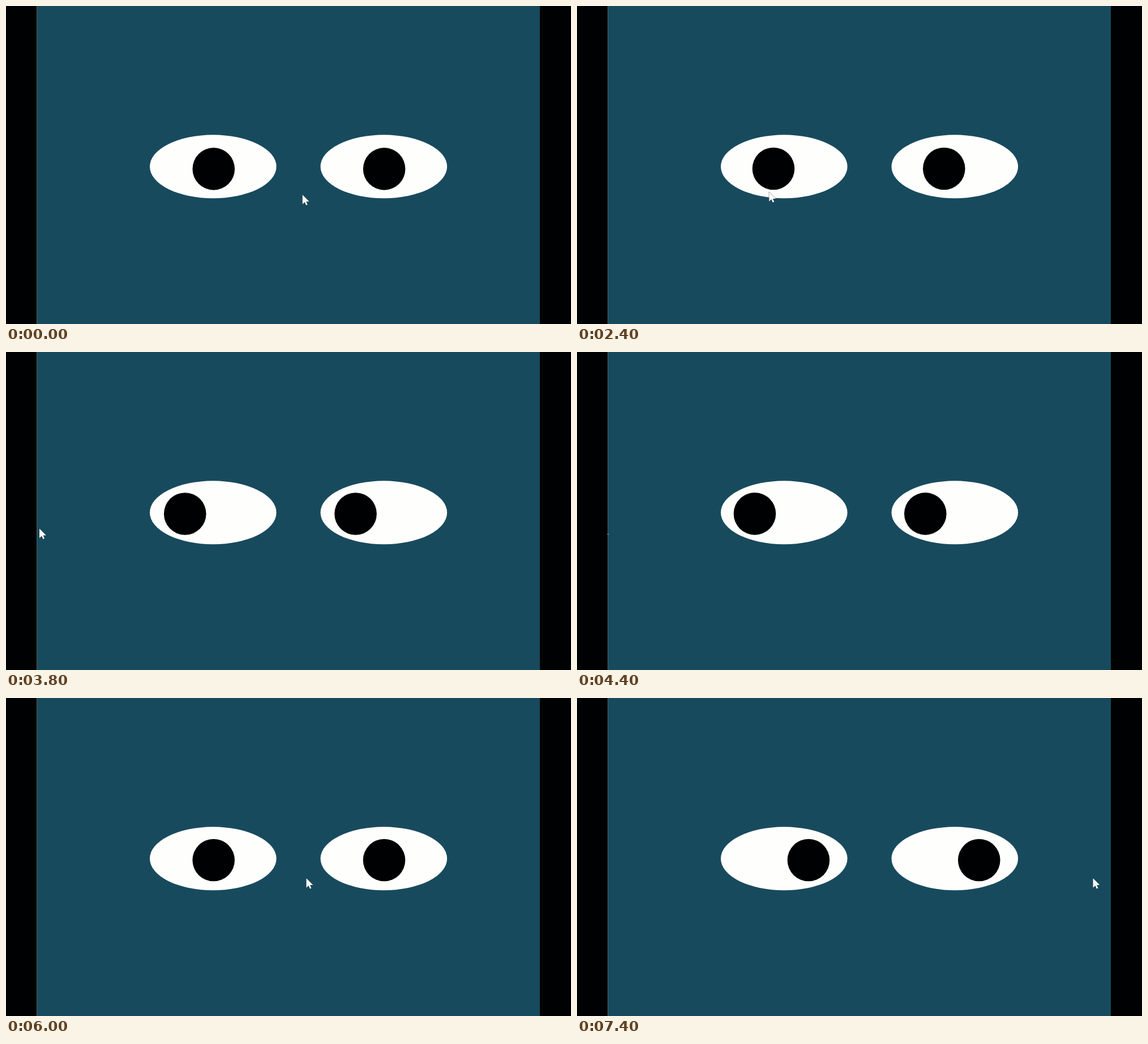
Animation of 998 by 561 pixels, one loop 8 s. Source, as an HTML page:

```html
<!DOCTYPE html>
<html lang="en">
<head>
<meta charset="utf-8">
<title>Watching eyes</title>
<style>
  html, body { margin: 0; width: 100%; height: 100%; overflow: hidden; background: #000102; }
  svg { display: block; width: 100%; height: 100%; }
</style>
</head>
<body>
<svg viewBox="0 0 998 561">
  <rect x="54" width="889" height="561" fill="#184a5d"/>
  <rect x="54" width="1" height="561" fill="#4b5f59"/>
  <g fill="#fefefd">
    <ellipse cx="365.8" cy="283.3" rx="111.8" ry="56"/>
    <ellipse cx="667.3" cy="283.3" rx="111.8" ry="56"/>
  </g>
  <g id="pupils" fill="#000102">
    <circle r="37.3"/>
    <circle cx="301.3" r="37.3"/>
  </g>
  <path id="cursor" d="M0 0V16.8L3.9 13.1L6.4 18.6L9 17.5L6.6 12H11.9Z"
        fill="#fefefd" stroke="#1c2a30" stroke-width=".9" paint-order="stroke"/>
  <g fill="#000102">
    <rect width="54" height="561"/>
    <rect x="943" width="55" height="561"/>
  </g>
</svg>
<script>
  const LOOP = 8000;
  const STEP = 200;
  const LAG = 25; // the pupils trail the pointer slightly

  const linear = k => k;
  const speedUp = k => k * k;
  const slowDown = k => k * (2 - k);

  // Turning points of the pointer; ease shapes the way to each one.
  const stops = [
    { t: 1200, x: 523.7, y: 333, ease: linear },
    { t: 2400, x: 339.3, y: 328, ease: linear },
    { t: 3200, x: 190.5, y: 319.5, ease: linear },
    { t: 4200, x: 34, y: 310, ease: slowDown },
    { t: 5200, x: 288.5, y: 313.5, ease: speedUp },
    { t: 6000, x: 530.5, y: 318, ease: linear },
    { t: 7200, x: 892, y: 318, ease: linear },
    { t: 7400, x: 911.5, y: 318, ease: linear }
  ];

  const cursor = document.getElementById("cursor");
  const pupils = document.getElementById("pupils");

  function pointer(time) {
    const next = stops.findIndex(s => s.t > time);
    if (next === 0) return stops[0];
    if (next < 0) return stops[stops.length - 1];
    const a = stops[next - 1];
    const b = stops[next];
    const k = b.ease((time - a.t) / (b.t - a.t));
    return { x: a.x + (b.x - a.x) * k, y: a.y + (b.y - a.y) * k };
  }

  function place(el, x, y) {
    el.setAttribute("transform", `translate(${x.toFixed(2)} ${y.toFixed(2)})`);
  }

  function draw(time) {
    const t = Math.floor((time % LOOP) / STEP) * STEP;
    const tip = pointer(t);
    const gaze = pointer(t - LAG);
    place(cursor, tip.x, tip.y);
    place(pupils, 366.9 + (gaze.x - 525) * 0.1095, 287.4 + (gaze.y - 333) * 0.09);
  }

  const start = performance.now();
  function tick() {
    draw(performance.now() - start);
    requestAnimationFrame(tick);
  }
  tick();
</script>
</body>
</html>
```
